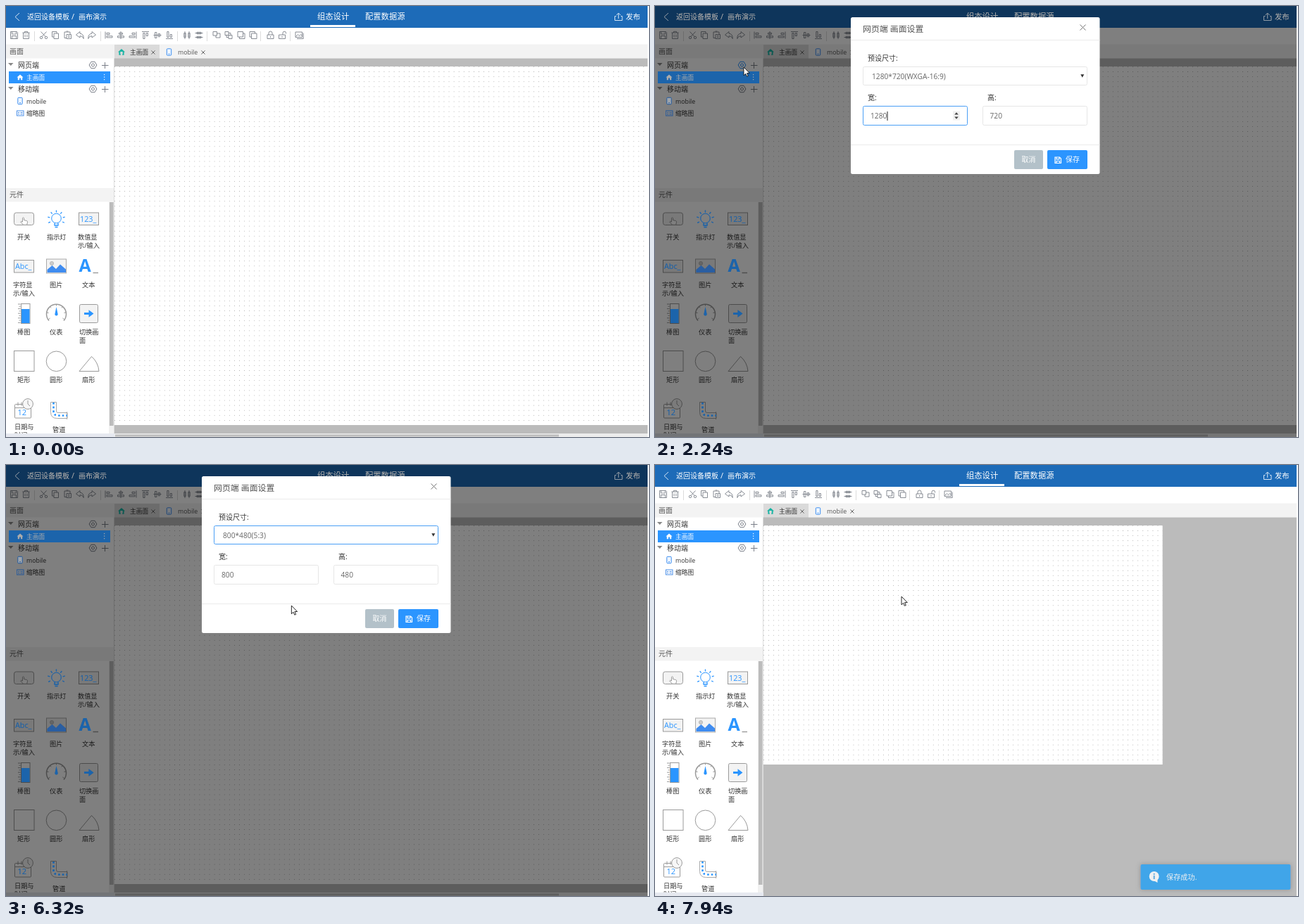
Animation, 913 px wide and 613 px high, one loop 8 s. Source, as an HTML page:

```html
<!DOCTYPE html>
<html lang="zh-CN">
<head>
<meta charset="utf-8">
<title>画布设置</title>
<style>
html, body { margin: 0; width: 100%; height: 100%; overflow: hidden; background: #fff; }
svg { display: block; width: 913px; height: 613px; font-family: "Open Sans", "Noto Sans CJK SC", "Noto Sans CJK", sans-serif; }
text { white-space: pre; }
</style>
</head>
<body>
<svg id="stage" viewBox="0 0 913 613"></svg>
<script>
const BLUE = '#2b95ff', GRAY = '#9a9a9a', TOOL = '#7b808a', INK = '#333';
const UNIT = 510 / 72; // one grid cell

const rect = (x, y, w, h, fill, more = '') =>
  `<rect x="${x}" y="${y}" width="${w}" height="${h}" fill="${fill}" ${more}/>`;
const box = (x, y, w, h, stroke, fill = 'none', more = '') =>
  rect(x, y, w, h, fill, `stroke="${stroke}" ${more}`);
const line = (d, stroke = TOOL, more = '') => `<path d="${d}" fill="none" stroke="${stroke}" ${more}/>`;
const shape = (d, fill) => `<path d="${d}" fill="${fill}"/>`;
const circle = (x, y, r, stroke, fill = 'none') =>
  `<circle cx="${x}" cy="${y}" r="${r}" stroke="${stroke}" fill="${fill}"/>`;
const text = (x, mid, size, str, fill = INK, more = '') =>
  `<text x="${x}" y="${mid + size * 0.37}" font-size="${size}" fill="${fill}" ${more}>${str}</text>`;
const at = (x, y, inner, more = '') => `<g transform="translate(${x} ${y})" ${more}>${inner}</g>`;

const cross = (x, y, r, color) => line(`M${x - r} ${y - r}L${x + r} ${y + r}M${x + r} ${y - r}L${x - r} ${y + r}`, color);
const phone = (x, y) => box(x - 3.2, y - 4.7, 6.4, 9.4, '#3d8ef0', '#eef6ff', 'rx="1"') + line(`M${x - 1} ${y + 2.7}h2`, '#3d8ef0');
const home = (x, y, k, color) => at(x, y, `<g transform="scale(${k})">${shape('M0-4.5L-5 0h1.4v4.2h2.5V1h2.2v3.2h2.5V0H5Z', color)}</g>`);
const gear = (x, y, id) => at(x, y,
  `<g id="${id}" stroke="${TOOL}" fill="none"><path d="M-2.6-4.7h5.2L5.4 0 2.6 4.7h-5.2L-5.4 0Z"/><circle r="2"/></g>`);

function toolbar() {
  const icons = [
    [11.5, 'M-5-5H4L5-4V5H-5ZM-3-5v3.5h6V-5M-3 5V1h6v4'],
    [28.5, 'M-5-3.5H5M-2-3.5v-1.7h4v1.7M-4-3.5V5h8v-8.5M-1.5-1v4M1.5-1v4'],
    [53.5, 'M-4-5L2.5 2M4-5L-2.5 2M-1.8 3.4a1.7 1.7 0 1 1-3.4 0 1.7 1.7 0 1 1 3.4 0M5.2 3.4a1.7 1.7 0 1 1-3.4 0 1.7 1.7 0 1 1 3.4 0'],
    [70, 'M-2-2.5h6.5V5H-2ZM-2 2.5h-2.5V-5H2v2.5'],
    [88, 'M-2 4h-3v-8.5h8V-1M-2.5-5.5h3M-2-1h6.5V5H-2ZM0 1h2.5M0 3h2.5'],
    [105, 'M0-5L-5.5-.5 0 3.5V1q4 0 5.2 4Q5.5-2 0-2.3Z'],
    [122, 'M0-5L5.5-.5 0 3.5V1q-4 0-5.2 4Q-5.5-2 0-2.3Z'],
    [146, 'M-5-5V5M-3-3.2h4v2.2h-4ZM-3 1.2h8v2.2h-8Z'],
    [163, 'M0-5.5v11M-2.5-3.2h5v2h-5ZM-4.5 1.2h9v2.2h-9Z'],
    [180, 'M5-5V5M-1-3.2h4v2.2h-4ZM-5 1.2h8v2.2h-8Z'],
    [198, 'M-5-5H5M-3.2-3v8h2.2v-8ZM1.2-3v4h2.2v-4Z'],
    [215, 'M-5.5 0h11M-3.5-4v8h2.4v-8ZM1.2-2.2v4.4h2.4v-4.4Z'],
    [232, 'M-5 5H5M-3.2-5v8h2.2v-8ZM1.2-1v4h2.2v-4Z'],
    [257, 'M-3-5.5v11M3-5.5v11M-4.2-3h2.4v6h-2.4ZM1.8-3h2.4v6H1.8Z'],
    [274, 'M-5.5-3h11M-5.5 3h11M-3-4.2h6v2.4h-6ZM-3 1.8h6v2.4h-6Z'],
    [299, 'M-5-5h5.5v5.5H-5ZM-1 .5v3h6v-6H.5'],
    [316, 'M-5-5h5v5h-5ZM0 0h5v5H0ZM0-3h3v3M-3 0v3h3'],
    [334, 'M-5-5h7.5v7.5H-5ZM-2.5 2.5V5H5v-7.5H2.5'],
    [351, 'M-2.5-2.5H5V5h-7.5ZM-2.5 2.5H-5V-5h7.5v2.5'],
    [375.5, 'M-4.5-.5h9V5h-9ZM-2.5-.5v-2.5a2.5 2.5 0 0 1 5 0v2.5M0 1.5v2'],
    [392.5, 'M-5-.5h9V5h-9ZM.5-.5V-3a2.3 2.3 0 0 1 4.6 0v1M-.5 1.5v2'],
    [416.5, 'M-5.5-4.5h9.5v7.5h-9.5ZM-5 2l3-3 2 2 2-2 2 2M-3.5 5h9.2v-8']
  ];
  const bars = [40, 134, 243, 285, 361, 403].map(x => `M${x + .5} 36v14`).join('');
  return line(bars, '#dcdcdc') + icons.map(([x, d]) => at(x, 41.5, line(d, TOOL, 'stroke-width=".9"'))).join('');
}

function panels() {
  return rect(0, 0, 913, 613, '#fff')
    + rect(0, 0, 911, 31, '#1d6bb8')
    + toolbar()
    + rect(0, 54.5, 153, 20, '#f3f3f3') + text(5, 64.5, 10, '画面', '#555')
    + rect(153, 54.5, 758, 20, '#f3f3f3') + rect(154, 55, 64, 20, '#dadada')
    + home(164, 65.5, 1, '#17b3a3') + shape('M162.3 65h3.4v3.6h-3.4Z', '#dadada')
    + text(176, 65.5, 8.7, '主画面') + cross(209, 66, 2.6, '#666')
    + phone(231.5, 65.5) + text(244, 65.5, 8.8, 'mobile', '#555') + cross(280, 66, 2.6, '#666')
    + [84, 118].map((y, i) => shape(`M3 ${y - 3}h7.5l-3.7 4Z`, '#888')
      + text(17, y, 10, i ? '移动端' : '网页端') + gear(123.5, y, 'gear' + i)
      + line(`M136 ${y + .5}h9.5M140.5 ${y - 4}v9`, TOOL)).join('')
    + text(29, 135.5, 8.8, 'mobile') + text(29, 152.5, 8.7, '缩略图')
    + rect(0, 259, 153, 19.5, '#f3f3f3') + text(5, 268.5, 10, '元件', '#555');
}

// Coloured and bright parts, which keep more strength under the backdrop
function accents() {
  const rays = [...Array(7)].map((_, i) => {
    const a = Math.PI * (.86 + i * .213), c = Math.cos(a), s = Math.sin(a);
    return `M${71.5 + 9.5 * c} ${303 + 9.5 * s}L${71.5 + 12.5 * c} ${303 + 12.5 * s}`;
  }).join('');
  return line('M19 10l-6 5.5 6 5.5', '#d5e5f5')
    + text(30, 15, 10, '返回设备模板', '#fff') + text(93, 15, 11, '/', '#fff') + text(103, 15, 10, '画布演示', '#fff')
    + text(442, 15, 11.3, '组态设计', '#fff') + text(510, 15, 11.3, '配置数据源', '#fff')
    + rect(432, 27, 64, 3, '#fff')
    + line('M866.5 14.5h-2V20.5h10.5v-6h-2M869.7 18v-7.5M866.8 13l2.9-3 2.9 3', '#d5e5f5') + text(880, 15, 10.3, '发布', '#fff')
    + rect(4, 93, 144, 17, BLUE) + home(20, 101.5, .9, '#fff') + text(29, 101.5, 8.7, '主画面', '#fff')
    + [97.5, 101, 104.5].map(y => rect(139, y - .5, 1.2, 1.2, '#fff')).join('')
    + phone(20, 135)
    + box(15.5, 149, 9.5, 7, '#4a8fe8') + line('M17 151.5h2M17 153.8h2M20.5 151.5h3M20.5 153.8h3', '#4a8fe8')
    + circle(71.5, 302, 6.8, BLUE) + line('M69 309v3h5v-3M69.5 314.5h4' + rays, BLUE, 'stroke-width="1.3"')
    + text(105, 303, 10.8, '123_', BLUE) + text(13, 370, 10.8, 'Abc_', BLUE)
    + shape('M58.5 379V375l7-6 5.5 5 6-6.5 8 7V379Z', '#3f8cf0')
    + text(103.5, 369, 25, 'A', BLUE, 'font-weight="700"')
    + rect(22, 431, 11.5, 20, BLUE)
    + shape('M71.5 428l2 9.5a2.2 2.2 0 1 1-4 0Z', BLUE)
    + shape('M111 436h6.5v-3.8l7 5.3-7 5.3V439H111Z', BLUE)
    + text(16.5, 578, 11, '12', BLUE)
    + line('M67.5 564v12q0 6.5 6.5 6.5h13', BLUE, 'stroke-width="2.6" stroke-dasharray="2.6 3"');
}

function parts() {
  const pale = '#f3f3f3';
  const labels = [
    [16, 329, '开关'], [58, 329, '指示灯'], [102, 329, '数值显', '示/输入'],
    [10, 396.5, '字符显', '示/输入'], [62, 396.5, '图片'], [108, 396.5, '文本'],
    [16, 464, '棒图'], [62, 464, '仪表'], [104, 464, '切换画', '面'],
    [16, 531.5, '矩形'], [62, 531.5, '圆形'], [108, 531.5, '扇形'],
    [12, 598.5, '日期与', '时间'], [66, 602.5, '管道']
  ];
  const ticks = [...Array(9)].map((_, i) => `M${i % 2 ? 18.5 : 17} ${424 + i * 3.3}h${i % 2 ? 2 : 3.5}`).join('');
  const dial = [...Array(7)].map((_, i) => {
    const a = Math.PI * (.8 + i * .233), c = Math.cos(a), s = Math.sin(a);
    return `M${71.5 + 11 * c} ${437.5 + 11 * s}L${71.5 + 13.5 * c} ${437.5 + 13.5 * s}`;
  }).join('');
  return box(11.5, 294, 28, 17.5, GRAY, pale, 'rx="3"')
    + `<path d="M23.5 307v-5.5q1-1.6 2 0v3l4 1q1.2.3 1 1.8l-.8 4h-5l-4-4.3q.3-1.6 2.8 0Z" fill="#fff" stroke="${GRAY}"/>`
    + box(103.5, 294, 28, 17.5, GRAY, pale) + box(11.5, 361.5, 28, 17.5, GRAY, pale)
    + box(57.5, 360, 28, 20, '#aaa', pale) + circle(65, 366, 2.6, '#bbb', '#ccc')
    + line('M123.5 379.5h7.5', GRAY, 'stroke-width="1.4"')
    + box(21.5, 423.5, 12.5, 28, GRAY) + line(ticks, GRAY)
    + line('M61 447.5a14 14 0 1 1 21 0', GRAY, 'stroke-width="1.5"') + line(dial, GRAY)
    + box(104.5, 424.5, 26, 26, GRAY, pale, 'rx="2"')
    + box(11.5, 490.5, 28.5, 29, GRAY) + circle(71.5, 505.3, 14.3, GRAY)
    + line('M104 519.5L121.5 498.5Q131 507 132 519.5Z', GRAY)
    + box(12.5, 566.5, 23, 19.5, GRAY, '#fff', 'rx="1"') + line('M12.5 571.5h23M17 563.5v5M22 563.5v5', GRAY)
    + circle(31, 566, 7.4, GRAY, '#f7f7f7') + line('M31 561v5l3 3', GRAY)
    + line('M63.5 563.5h8M63.5 563.5v14q0 9 9 9H87v-8H74q-2.5 0-2.5-2.5v-12.5M86.5 577v11', '#a9a9a9')
    + labels.map(([x, y, ...rows]) => rows.map((s, i) => text(x, y + i * 12, 9.2, s)).join('')).join('')
    + rect(146, 278.5, 7, 330, '#f1f1f1') + rect(147, 279, 5.5, 318, '#bcbcbc')
    + rect(0, 608, 154, 5, '#e6e9f0');
}

function workspace() {
  return rect(153.5, 74.5, 757.5, 538.5, '#bbb')
    + `<g id="page">${rect(154, 86, 757, 510, '#fff')}${rect(154, 86, 757, 510, 'url(#dots)')}</g>`
    + `<g id="hbar">${rect(154, 608, 757, 5, '#ececec')}${rect(155, 609.5, 630, 3, '#bdbdbd')}</g>`;
}

const presets = ['3840*2160(4K-16:9)', '2560*1440(2K-16:9)', '1920*1080(FHD-16:9)', '1366*768(HD-16:9)',
  '1280*720(WXGA-16:9)', '1024*768(XGA-4:3)', '800*480(5:3)', '自定义'];
const ROW = 14.2, LIST_TOP = 113.5, FONT = 10.2;

function dialog() {
  const soft = '#e6e6e6', gray = '#666';
  return rect(278, 16, 353.5, 223, '#fff', 'rx="2.5"')
    + text(295, 33, 11.9, '网页端 画面设置', '#555') + cross(607.5, 30.5, 4, '#777')
    + line('M278 48.5h353.5M278 197.5h353.5', '#ebebeb')
    + text(302, 74, 10, '预设尺寸:')
    + box(295.5, 86.5, 318, 26, soft, '#fff', 'id="select" rx="2"')
    + text(308, 100.5, FONT, '', gray, 'id="preset"') + shape('M604.3 97.3h5l-2.5 4.4Z', INK)
    + text(302, 130, 10, '宽:') + text(472, 130, 10, '高:')
    + box(295.5, 142.5, 148, 27, soft, '#fff', 'id="wide" rx="2"') + box(465.5, 142.5, 148, 27, soft, '#fff', 'rx="2"')
    + text(306, 156, FONT, '', gray, 'id="wideText"') + text(475.5, 156, FONT, '', gray, 'id="highText"')
    + `<g id="spin">${rect(423, 149.5, 10, 13, '#f1f1f1')}${shape('M425.2 154.5h5.6l-2.8-3.2ZM425.2 157.5h5.6l-2.8 3.2Z', '#444')}</g>`
    + rect(329.5, 150, 1, 13, '#222', 'id="caret"')
    + rect(510, 205, 41, 27, '#b3c1c9', 'rx="2"') + text(520.5, 218.5, 10, '取消', '#fff', 'font-weight="500"')
    + rect(557, 205, 57, 27, BLUE, 'id="save" rx="2"')
    + line('M568 215h6.5l2 2v6.5H568ZM570 215v2.8h4V215M570 223.5v-3h4.5v3', '#fff', 'stroke-width="1.2"')
    + text(583, 218.5, 10, '保存', '#fff', 'font-weight="500"')
    + `<g id="list">${box(295.5, 112.5, 318, 115, '#5a9fe0', '#fff')}${rect(296, 0, 317.5, ROW + .3, '#0a8dff', 'id="mark"')}`
    + presets.map((s, i) => text(309, LIST_TOP + ROW * (i + .5), FONT, s, gray, 'class="row"')).join('') + '</g>';
}

function toast() {
  return rect(689.5, 568, 213, 36, '#20a0f5', 'rx="2" filter="url(#glow)"')
    + circle(708.7, 585, 7, 'none', '#fff') + shape('M708 591l5.5-1.5v4.5Z', '#fff')
    + rect(707.7, 583.8, 2, 5.2, '#4aa8e8') + rect(707.7, 580.8, 2, 1.9, '#4aa8e8')
    + text(726, 586, 10.2, '保存成功.', '#fff', 'font-weight="500"');
}

document.getElementById('stage').innerHTML = `<defs>
  <pattern id="dots" x="154" y="86" width="${UNIT}" height="${UNIT}" patternUnits="userSpaceOnUse">${rect(0, 0, .85, .85, '#a2a2a2')}</pattern>
  <filter id="glow" x="-10%" y="-40%" width="120%" height="180%"><feDropShadow dx="0" dy="0" stdDeviation="3" flood-color="#888"/></filter>
  </defs>`
  + panels() + workspace() + parts()
  + `<g id="accents">${accents()}</g>`
  + `<g id="shade">${rect(0, 0, 911, 613, '#000', 'opacity=".5"')}<use href="#accents" opacity=".35"/></g>`
  + `<g id="dialog">${dialog()}</g><g id="toast">${toast()}</g>`
  + `<path id="cursor" d="M0 0V11.8L2.7 9.3 4.5 13.3 6.3 12.5 4.6 8.6H8.3Z" fill="#fff" stroke="#111" stroke-width=".9"/>`;

const ui = {};
document.querySelectorAll('[id]').forEach(e => ui[e.id] = e);
const rows = [...document.querySelectorAll('.row')];
const pages = [...ui.page.children];

const path = [
  [140, 799, 550], [900, 125, 94], [980, 127, 97], [1230, 126, 87], [2310, 126, 87], [3160, 397, 99],
  [3250, 397, 99], [3720, 434, 99], [4830, 434, 99], [4900, 432, 126], [5670, 382, 203], [6250, 382, 203],
  [6320, 405, 200], [6480, 460, 188], [6850, 595, 217], [7500, 595, 217], [7790, 465, 204], [7940, 350, 187], [8000, 350, 187]
];
const ramp = (t, a, b) => Math.min(1, Math.max(0, (t - a) / (b - a)));
const smooth = p => p * p * (3 - 2 * p);
const within = (t, a, b) => t >= a && t < b;
const show = (el, on) => el.setAttribute('visibility', on ? 'inherit' : 'hidden');
const set = (el, name, value) => el.setAttribute(name, value);

function pointer(t) {
  const i = Math.max(1, path.findIndex(k => k[0] > t));
  const [t0, x0, y0] = path[i - 1], [t1, x1, y1] = path[i];
  const p = ramp(t, t0, t1), e = t1 - t0 > 300 ? smooth(p) : p;
  return [x0 + (x1 - x0) * e, y0 + (y1 - y0) * e];
}

function render(t) {
  const [x, y] = pointer(t);
  show(ui.cursor, t >= 140);
  set(ui.cursor, 'transform', `translate(${x} ${y})`);
  set(ui.gear0, 'stroke', within(t, 980, 2350) ? BLUE : TOOL);

  set(ui.shade, 'opacity', t < 1610 ? 0 : 1 - ramp(t, 7500, 7700));
  const open = smooth(ramp(t, 1670, 1970)) * (1 - smooth(ramp(t, 7160, 7440)));
  show(ui.dialog, open > 0);
  set(ui.dialog, 'opacity', open);
  set(ui.dialog, 'transform', `translate(0 ${(open - 1) * 56})`);

  const typing = within(t, 1990, 4200), picked = t >= 6000;
  set(ui.wide, 'stroke', typing ? '#4a9ff5' : '#e6e6e6');
  show(ui.spin, typing);
  show(ui.caret, typing && Math.floor((t - 1560) / 530) % 2 === 1 || within(t, 1990, 2090));
  set(ui.select, 'stroke', within(t, 4200, 7000) ? '#4a9ff5' : '#e6e6e6');
  ui.preset.textContent = presets[picked ? 6 : 4];
  ui.wideText.textContent = picked ? 800 : 1280;
  ui.highText.textContent = picked ? 480 : 720;
  set(ui.save, 'fill', t >= 6750 ? '#2087ee' : BLUE);

  const active = t < 4860 ? 4 : Math.max(0, Math.min(7, Math.floor((y - LIST_TOP) / ROW)));
  show(ui.list, within(t, 4200, 6000));
  set(ui.mark, 'y', LIST_TOP - .3 + ROW * active);
  rows.forEach((r, i) => set(r, 'fill', i === active ? '#fff' : '#666'));

  const small = t >= 7240;
  pages.forEach(p => {
    set(p, 'width', small ? 80 * UNIT : 757);
    set(p, 'height', small ? 48 * UNIT : 510);
  });
  show(ui.hbar, !small);
  set(ui.toast, 'opacity', .8 * ramp(t, 7150, 7450));
}

function tick(now) {
  render(now % 8000);
  requestAnimationFrame(tick);
}
render(0);
requestAnimationFrame(tick);
</script>
</body>
</html>
```
